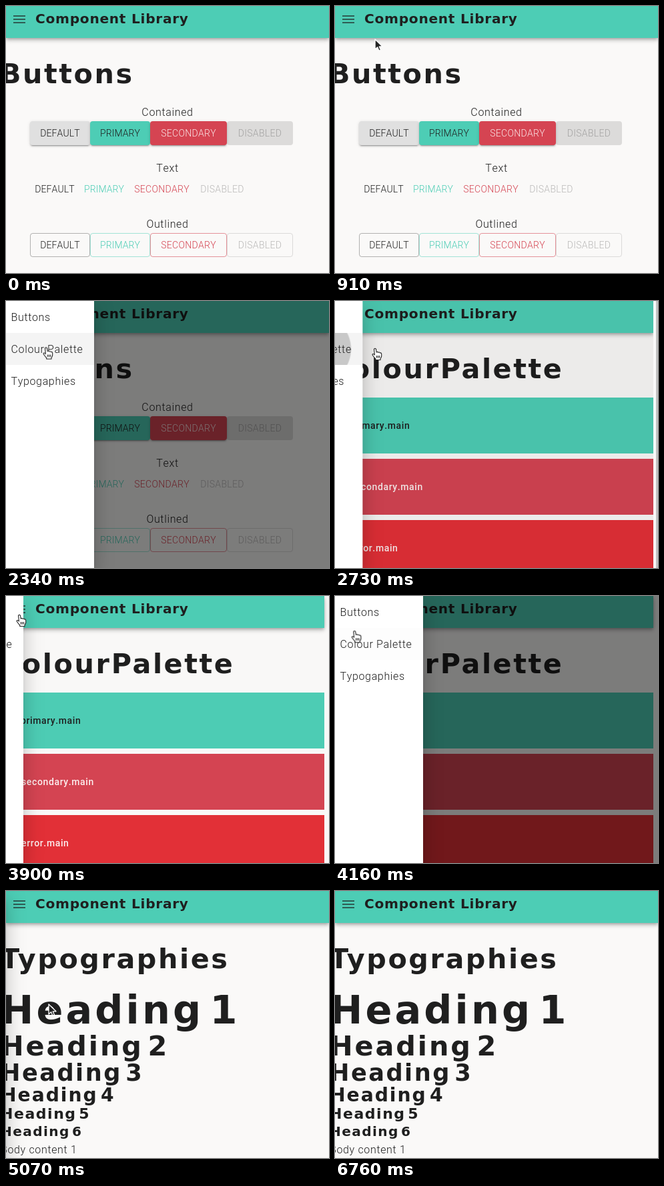
Animation, 484 px wide and 401 px high, one loop 6890 ms. Source, as an HTML page:

```html
<!DOCTYPE html>
<html lang="en">
<head>
<meta charset="utf-8">
<title>Component Library</title>
<style>
html, body { margin: 0; width: 100%; height: 100%; overflow: hidden; background: #faf9f8; }
.stage, .stage div, .stage svg { position: absolute; }
.stage {
  left: 0; top: 0; width: 484px; height: 401px; overflow: hidden;
  --teal: #4dcdb5; --red: #d54452; --ink: #1f1f1f;
  --std: cubic-bezier(.4, 0, .2, 1);
  --out: cubic-bezier(0, 0, .2, 1);
  --sharp: cubic-bezier(.4, 0, .6, 1);
  color: var(--ink); font: 300 16px Roboto, sans-serif; font-kerning: none;
}
.stage * { animation-play-state: paused !important; box-sizing: border-box; }
svg { left: 0; top: 0; overflow: visible; }
text { fill: var(--ink); letter-spacing: .65px; }
.wide { font: bold 20.1px "DejaVu Sans", sans-serif; letter-spacing: .07em; word-spacing: -.26em; }
.brand { letter-spacing: .037em; word-spacing: 0; }
.title { font-size: 41.3px; letter-spacing: .062em; word-spacing: -.4em; }
.mid { text-anchor: middle; }
.code { font-size: 14px; font-weight: 500; letter-spacing: .62px; }
.light { fill: #fdf0f0; }

/* pages */
.page { inset: 0; visibility: hidden; }
.buttons { visibility: visible; animation: hide 1ms 2600ms forwards; }
.palette { animation: show 1ms 2600ms forwards, hide 1ms 4877ms forwards; }
.types { animation: show 1ms 4877ms forwards; }
.bar {
  left: 0; top: 0; width: 484px; height: 48px; background: var(--teal);
  box-shadow: 0 2px 4px -1px #0003, 0 4px 5px #00000024, 0 1px 10px #0000001f;
}
.palette .bar, .swatch { width: 477px; }
.swatch { left: 0; height: 84px; }

/* buttons */
.row { left: 36px; display: flex; }
.stage .row div {
  position: relative; width: 90px; height: 36px; line-height: 36px; border-radius: 4px;
  text-align: center; font-size: 14px; letter-spacing: .1px;
}
.row div:nth-child(3) { width: 115px; letter-spacing: .3px; }
.row div:nth-child(4) { width: 99px; letter-spacing: .3px; color: #00000042; }
.solid div { background: #e0e0e0; box-shadow: 0 3px 1px -2px #0003, 0 2px 2px #00000024, 0 1px 5px #0000001f; }
.solid div:nth-child(2) { background: var(--teal); }
.solid div:nth-child(3) { background: var(--red); color: #fbe6e7; }
.solid div:nth-child(4) { background: #0000001f; box-shadow: none; }
.plain div:nth-child(2), .lined div:nth-child(2) { color: var(--teal); }
.plain div:nth-child(3), .lined div:nth-child(3) { color: var(--red); }
.stage .plain div { width: 74px; }
.stage .plain div:nth-child(3) { width: 99px; }
.stage .plain div:nth-child(4) { width: 82px; }
.stage .lined div { border: 1px solid #0000004a; line-height: 34px; }
.stage .lined div:nth-child(2) { border-color: #4dcdb580; }
.stage .lined div:nth-child(3) { border-color: #d5445290; }
.stage .lined div:nth-child(4) { border-color: #0000001f; }

/* drawer */
.shade {
  inset: 0; background: #000; opacity: 0;
  animation: dim 225ms var(--std) 1497ms forwards, lit 195ms var(--std) 2610ms forwards,
    dim 225ms var(--std) 3887ms forwards, lit 195ms var(--std) 4877ms forwards;
}
.drawer {
  left: 0; top: 0; width: 132px; height: 401px; background: #fff; visibility: hidden;
  box-shadow: 0 8px 10px -5px #0003, 0 16px 24px 2px #0000001c, 0 6px 30px 5px #00000018;
  animation: open 225ms var(--out) 1497ms forwards, shut 195ms var(--sharp) 2610ms forwards,
    open 225ms var(--out) 3887ms forwards, shut 195ms var(--sharp) 4877ms forwards;
}
.item { left: 0; width: 132px; height: 48px; overflow: hidden; }
.item.a { top: 0; animation: on 150ms 1600ms forwards, off 150ms 1990ms forwards; }
.item.b {
  top: 48px;
  animation: on 150ms 1990ms forwards, off 1ms 2990ms forwards,
    on 150ms 4135ms forwards, off 150ms 4410ms forwards;
}
.item.c { top: 96px; animation: on 150ms 4410ms forwards; }
.ripple {
  width: 154px; height: 154px; left: -15px; top: -53px; border-radius: 50%;
  background: #0000002e; transform: scale(0); animation: grow 550ms var(--std) 2489ms;
}
.c .ripple { left: -23px; animation-delay: 4800ms; }

.scroll {
  left: 477px; top: 0; width: 7px; height: 401px; background: #f9f9f9;
  border-right: 3px solid #c1c1c1; visibility: hidden;
  animation: show 1ms 2600ms forwards, hide 1ms 3890ms forwards;
}

/* pointer */
.pointer { left: 0; top: 0; animation: roam 6890ms linear both; }
.pointer path { stroke-linejoin: round; visibility: hidden; }
.arrow {
  fill: #222; stroke: #fff; stroke-width: 1.3;
  animation: show 1ms 130ms forwards, hide 1ms 1030ms forwards, show 1ms 2850ms forwards,
    hide 1ms 3760ms forwards, show 1ms 5060ms forwards, hide 1ms 5970ms forwards;
}
.hand {
  fill: #fff; stroke: #222; stroke-width: 1.1;
  animation: show 1ms 1030ms forwards, hide 1ms 2850ms forwards,
    show 1ms 3760ms forwards, hide 1ms 5060ms forwards;
}

@keyframes show { from, to { visibility: visible; } }
@keyframes hide { from, to { visibility: hidden; } }
@keyframes dim { from { opacity: 0; } to { opacity: .5; } }
@keyframes lit { from { opacity: .5; } to { opacity: 0; } }
@keyframes open {
  from { transform: translateX(-132px); visibility: visible; }
  to { transform: none; visibility: visible; }
}
@keyframes shut {
  from { transform: none; visibility: visible; }
  to { transform: translateX(-132px); visibility: hidden; }
}
@keyframes on { from { background: #0000; } to { background: #0000000b; } }
@keyframes off { from { background: #0000000b; } to { background: #0000; } }
@keyframes grow { from { transform: scale(0); } to { transform: scale(1); } }
@keyframes roam {
  0%, 1.887% { transform: translate(470px, 350px); }
  9.434% { transform: translate(110px, 85px); }
  13.208% { transform: translate(60px, 50px); }
  15.094%, 22.642% { transform: translate(22px, 17px); }
  24.528% { transform: translate(24px, 20px); }
  32.075% { transform: translate(60px, 68px); }
  35.849%, 43.396% { transform: translate(60px, 71px); }
  54.717% { transform: translate(20px, 30px); }
  56.604% { transform: translate(20px, 28px); }
  58.491% { transform: translate(21px, 30px); }
  66.038% { transform: translate(54px, 119px); }
  69.811% { transform: translate(54px, 121px); }
  71.698% { transform: translate(57px, 135px); }
  73.585%, 79.245% { transform: translate(64px, 170px); }
  84.906%, 100% { transform: translate(150px, 385px); }
}
</style>
</head>
<body>
<div class="stage">
  <div class="page buttons">
    <div class="bar"></div>
    <div class="row solid" style="top:173px"><div>DEFAULT</div><div>PRIMARY</div><div>SECONDARY</div><div>DISABLED</div></div>
    <div class="row plain" style="top:257px"><div>DEFAULT</div><div>PRIMARY</div><div>SECONDARY</div><div>DISABLED</div></div>
    <div class="row lined" style="top:341px"><div>DEFAULT</div><div>PRIMARY</div><div>SECONDARY</div><div>DISABLED</div></div>
    <svg width="484" height="401">
      <text class="wide title" x="-9" y="116">Buttons</text>
      <text class="mid" x="242" y="165">Contained</text>
      <text class="mid" x="242" y="249">Text</text>
      <text class="mid" x="242" y="333">Outlined</text>
    </svg>
  </div>

  <div class="page palette">
    <div class="bar"></div>
    <div class="swatch" style="top:145px;background:var(--teal)"></div>
    <div class="swatch" style="top:237px;background:var(--red)"></div>
    <div class="swatch" style="top:329px;background:#e33037"></div>
    <svg width="484" height="401">
      <text class="wide title" x="-9" y="116">Colour Palette</text>
      <text class="code" x="22" y="192">primary.main</text>
      <text class="code light" x="23" y="284">secondary.main</text>
      <text class="code light" x="23" y="376">error.main</text>
    </svg>
  </div>

  <div class="page types">
    <div class="bar"></div>
    <svg width="484" height="401">
      <text class="wide title" x="-8" y="116">Typographies</text>
      <text class="wide" x="-8" y="199" style="font-size:58.9px">Heading 1</text>
      <text class="wide" x="-8" y="247" style="font-size:41.4px">Heading 2</text>
      <text class="wide" x="-8" y="285" style="font-size:35.2px">Heading 3</text>
      <text class="wide" x="-8" y="316" style="font-size:28.2px">Heading 4</text>
      <text class="wide" x="-8" y="342" style="font-size:22px">Heading 5</text>
      <text class="wide" x="-8" y="368">Heading 6</text>
      <text x="-8" y="394">Body content 1</text>
    </svg>
  </div>

  <svg width="484" height="48">
    <path d="M11 15h18M11 20h18M11 25h18" stroke="#1f1f1f" stroke-width="1.6" opacity=".85"/>
    <text class="wide brand" x="44" y="26">Component Library</text>
  </svg>

  <div class="shade"></div>
  <div class="scroll"></div>
  <div class="drawer">
    <div class="item a"></div>
    <div class="item b"><div class="ripple"></div></div>
    <div class="item c"><div class="ripple"></div></div>
    <svg width="132" height="144">
      <text x="7.5" y="30">Buttons</text>
      <text x="7.5" y="78">Colour Palette</text>
      <text x="7.5" y="126">Typogaphies</text>
    </svg>
  </div>

  <svg class="pointer" width="20" height="20">
    <path class="arrow" d="M0 0V15L3.6 11.7 6 17.2 8.5 16.1 6.2 10.8H11Z"/>
    <path class="hand" d="M-1.5 1.4Q0-1 1.5 1.4L2.2 6Q4 4.700 5 6.300 6.700 5.300 7.500 7 9.300 6.300 9.700 8.500V12Q9.200 14 8 15.500V17.500H.8V16Q-2 13-4 9.800-3.600 7.800-1.600 8.900L-.6 10ZM2.400 11V14.500M4.500 11V14.500M6.600 11V14.500"/>
  </svg>
</div>
<script>
const LOOP = 6890, STEP = 130;
const anims = document.getAnimations();
const start = performance.now();

function draw() {
  const t = (performance.now() - start) % LOOP;
  const held = Math.floor(t / STEP) * STEP;
  for (const a of anims) a.currentTime = held;
  requestAnimationFrame(draw);
}
draw();
</script>
</body>
</html>
```
